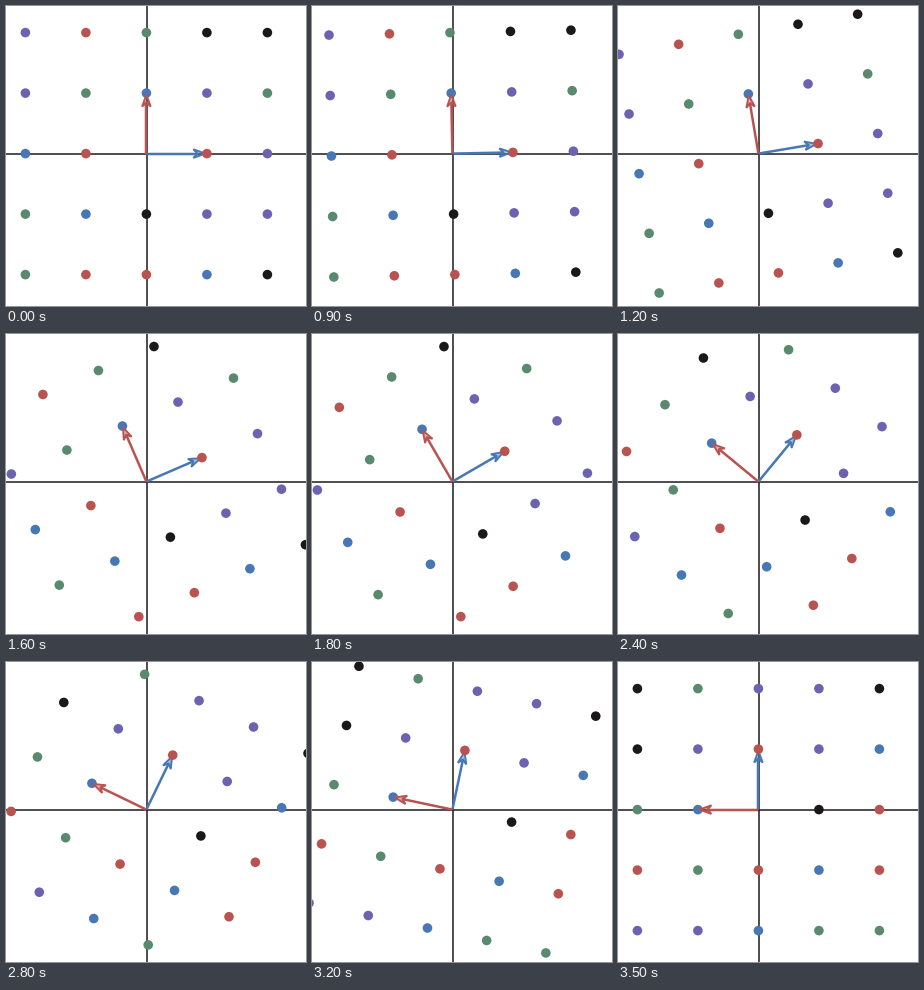
These frames come from a looping animation (300 px wide and 300 px high, 4200 ms). A matplotlib script:

```python
import matplotlib.pyplot as plt
import numpy as np
from matplotlib.animation import FuncAnimation
from matplotlib.patches import Polygon

SIZE, DPI = 300, 100
PX = 72 / DPI  # points per pixel
FRAMES, STEP_MS = 42, 100
HOLD = 8  # last still step before the turn
CX, CY, UNIT = 140.4, 147.6, 60.5

COLORS = {"B": "#4777b5", "R": "#b95350", "P": "#6c63b0",
          "G": "#5a8a6e", "K": "#1b181a"}
ROWS = ["PRGKK", "PGBPG", "BR.RP", "GBKPP", "GRRBK"]

# Turn angle in degrees: soft start, steady speed, quick finish
STEPS = [0, 1, 2, 3, 8, 13, 20, 24, 26, 27]
ANGLES = [0, 1.15, 3.1, 6.1, 23.35, 40.3, 64.2, 78.1, 85, 90]

cells = [(col - 2, 2 - row, key) for row, line in enumerate(ROWS)
         for col, key in enumerate(line) if key != "."]
grid = np.array([(x, y) for x, y, _ in cells]) * UNIT

fig = plt.figure(figsize=(SIZE / DPI, SIZE / DPI), dpi=DPI, facecolor="white")
ax = fig.add_axes([0, 0, 1, 1])
ax.set_xlim(0, SIZE)
ax.set_ylim(SIZE, 0)
ax.axis("off")

for xs, ys in (([0, SIZE], [CY, CY]), ([CX + 0.1] * 2, [0, SIZE])):
    ax.plot(xs, ys, color="#181518", lw=1.5 * PX, zorder=1)

dots = ax.scatter(grid[:, 0], grid[:, 1], s=(9.6 * PX) ** 2, linewidths=0,
                  c=[COLORS[key] for *_, key in cells], zorder=3)


def to_stage(points, deg):
    """Turn y-up points counterclockwise and place them on the stage."""
    a = np.radians(deg)
    x, y = np.asarray(points, float).T
    return np.column_stack([CX + x * np.cos(a) - y * np.sin(a),
                            CY - x * np.sin(a) - y * np.cos(a)])


class Arrow:
    SHAFT = [(0, 0), (UNIT - 9, 0)]
    HEAD = [(UNIT - 1.5, 0), (UNIT - 13.5, 4.3),
            (UNIT - 9.5, 0), (UNIT - 13.5, -4.3)]

    def __init__(self, color, base, zorder):
        self.base = base
        self.shaft, = ax.plot([], [], color=color, lw=2.5 * PX,
                              solid_capstyle="butt", zorder=zorder)
        self.head = Polygon(self.HEAD, closed=True, fc=(color, 0.45),
                            ec=color, lw=1.9 * PX, joinstyle="miter",
                            zorder=zorder)
        ax.add_patch(self.head)

    def turn(self, deg):
        self.shaft.set_data(*to_stage(self.SHAFT, self.base + deg).T)
        self.head.set_xy(to_stage(self.HEAD, self.base + deg))


arrows = [Arrow(COLORS["B"], 0, 2), Arrow(COLORS["R"], 90, 4)]


def draw(i):
    deg = np.interp(i - HOLD, STEPS, ANGLES)
    dots.set_offsets(to_stage(grid, deg))
    for arrow in arrows:
        arrow.turn(deg)
    return [dots] + [part for a in arrows for part in (a.shaft, a.head)]


anim = FuncAnimation(fig, draw, frames=FRAMES, interval=STEP_MS,
                     repeat=True, repeat_delay=0)
plt.show()
```
